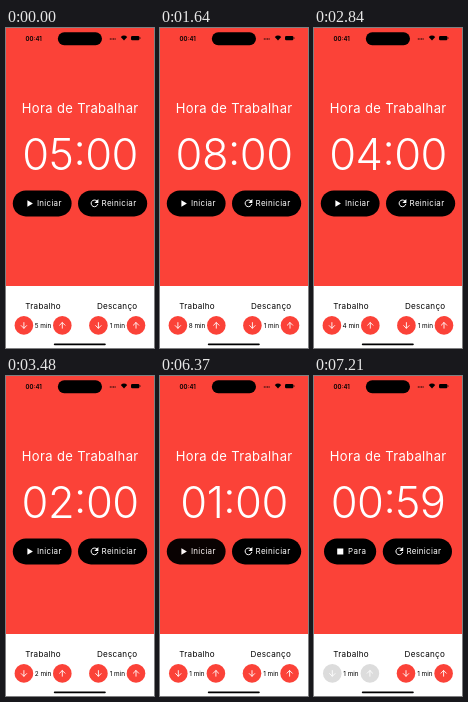
An HTML page that plays this animation: 148x320 px, repeating every 8 s.

```html
<!DOCTYPE html>
<html lang="pt">
<head>
<meta charset="utf-8">
<title>Timer</title>
<style>
  html, body { margin: 0; width: 100%; height: 100%; overflow: hidden; background: #fff; }
  svg { display: block; width: 100vw; height: 100vh; font-family: Inter, Roboto, sans-serif; }
  .mid { text-anchor: middle; }
  .title { font-size: 13px; letter-spacing: .35px; fill: #fff; }
  .clock { font-size: 43.5px; font-weight: 360; letter-spacing: -.5px; fill: #fff; font-feature-settings: "calt" 0; }
  .label { font-size: 8.1px; letter-spacing: .26px; }
  .minutes { font-size: 6.4px; }
  .pill text { font-size: 8px; letter-spacing: .28px; fill: #fff; }
  .arrow path, .line { fill: none; stroke: #fff; stroke-width: .9; stroke-linecap: round; stroke-linejoin: round; }
  .arrow circle, .red { fill: #fb4238; }
  .off .arrow circle { fill: #dcdcdc; }
</style>
</head>
<body>
<svg viewBox="0 0 148 320">
  <rect class="red" width="148" height="258"/>

  <!-- status bar -->
  <text x="19.6" y="12.6" font-size="6" font-weight="600">00:41</text>
  <rect x="51.8" y="4.3" width="44.2" height="12.9" rx="6.45"/>
  <path d="M103.8 11h6" stroke="#000" stroke-width="1.2" stroke-dasharray="1.1 .5"/>
  <path d="M114.8 9Q118 6.2 121.2 9L118 12.6z"/>
  <rect x="125" y="8" width="8.4" height="4.2" rx="1.2"/>
  <rect x="133.8" y="9.3" width=".6" height="1.6" rx=".3"/>

  <text class="mid title" x="74.2" y="84.7">Hora de Trabalhar</text>
  <text class="mid clock" x="74.1" y="141.6"><tspan id="mm"></tspan><tspan dy="-4.2">:</tspan><tspan id="ss" dy="4.2"></tspan></text>

  <g class="pill" id="main">
    <rect id="mainBack" height="26" rx="13"/>
    <path id="mainIcon" fill="#fff"/>
    <text id="mainText" x="24.1" y="16"></text>
  </g>
  <g class="pill" id="reset">
    <rect width="69.2" height="26" rx="13"/>
    <path class="line" style="stroke-width:1" d="M18.9 10.5A3.4 3.4 0 1 0 19.8 13.9"/>
    <path d="M20.4 8.6V12.6H16.4z" fill="#fff"/>
    <text x="23.6" y="16">Reiniciar</text>
  </g>

  <!-- steppers -->
  <g id="work">
    <text class="mid label" x="37.1" y="281.4">Trabalho</text>
    <g class="arrow" id="workDown"><circle r="9.3"/><path d="M0-2.8V2.8M-2.7.2L0 2.9 2.7.2"/></g>
    <text class="mid minutes" x="37" y="299.5" id="workText"></text>
    <g class="arrow" id="workUp"><circle r="9.3"/><path d="M0 2.8V-2.8M-2.7-.2L0-2.9 2.7-.2"/></g>
  </g>
  <g id="rest">
    <text class="mid label" x="111.2" y="281.4">Descanço</text>
    <g class="arrow" transform="translate(92.4 297.4)"><circle r="9.3"/><path d="M0-2.8V2.8M-2.7.2L0 2.9 2.7.2"/></g>
    <text class="mid minutes" x="111.3" y="299.5">1 min</text>
    <g class="arrow" transform="translate(130 297.4)"><circle r="9.3"/><path d="M0 2.8V-2.8M-2.7-.2L0-2.9 2.7-.2"/></g>
  </g>
  <rect x="47.8" y="315.4" width="52" height="1.8" rx=".9"/>
</svg>
<script>
  const LOOP = 8000, PRESS = 6370, START = 6480, RELEASE = 6630, TICK = 7210;
  // [time, work minutes]
  const taps = [[0, 5], [500, 6], [1110, 7], [1540, 8], [2030, 7], [2360, 6],
    [2600, 5], [2840, 4], [3140, 3], [3480, 2], [5230, 1]];
  const $ = id => document.getElementById(id);
  const move = (id, x, y) => $(id).setAttribute('transform', `translate(${x} ${y})`);

  function draw(t) {
    const minutes = taps.filter(([time]) => time <= t).pop()[1];
    const running = t >= START;
    const ticked = t >= TICK;
    $('mm').textContent = ticked ? '00' : '0' + minutes;
    $('ss').textContent = ticked ? '59' : '00';

    // narrow digits pull both steppers inwards
    const inset = { 1: .4, 7: .2 }[minutes] || 0;
    $('workText').textContent = minutes + ' min';
    move('workDown', 17.9 + inset, 297.4);
    move('workUp', 56.3 - inset, 297.4);
    move('rest', -inset, 0);
    $('work').setAttribute('class', running ? 'off' : '');

    move('main', running ? 10 : 6.8, 162.4);
    move('reset', running ? 68.8 : 72, 162.4);
    $('mainBack').setAttribute('width', running ? 52.2 : 58.8);
    $('mainIcon').setAttribute('d', running ? 'M13.2 10h6.1v6.1h-6.1z' : 'M14.6 9.9L20.1 13.1 14.6 16.3z');
    $('mainText').textContent = running ? 'Para' : 'Iniciar';
    $('main').setAttribute('opacity', t >= PRESS && t < RELEASE ? .96 : 1);
  }

  const begin = performance.now();
  function frame() {
    draw((performance.now() - begin) % LOOP);
    requestAnimationFrame(frame);
  }
  frame();
</script>
</body>
</html>
```
